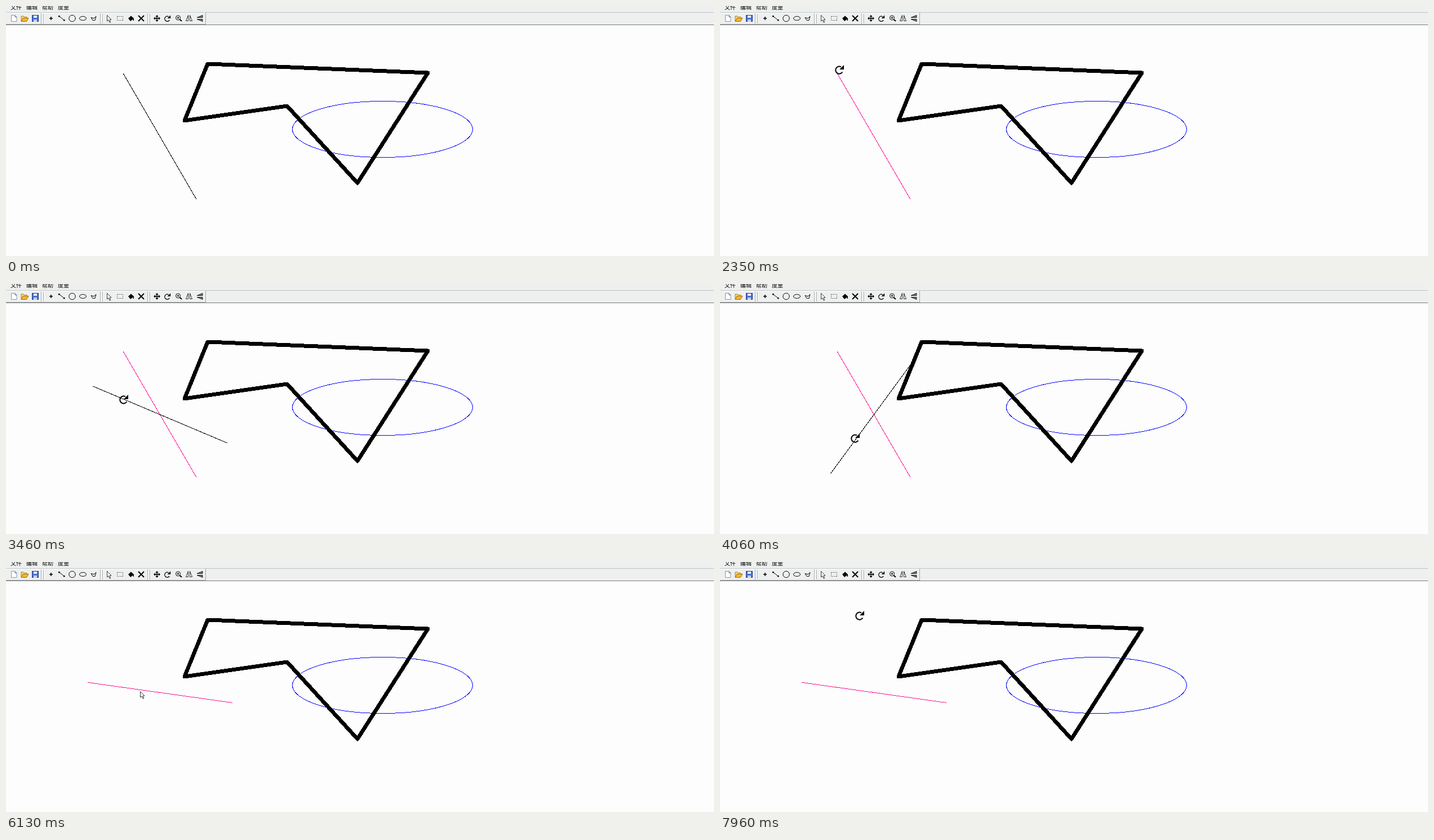
Animation of 1257 by 445 pixels, one loop 7990 ms. Source, as an HTML page:

```html
<!DOCTYPE html>
<html lang="zh">
<head>
<meta charset="utf-8">
<style>
html, body { margin: 0; width: 100%; height: 100%; overflow: hidden; background: #fdfdfd; }
svg { display: block; }
text { font: 10px "Noto Sans CJK SC", "Noto Sans CJK", sans-serif; }
.crisp { shape-rendering: crispEdges; }
.ink { fill: none; stroke: #000; }
</style>
</head>
<body>
<svg width="1257" height="445" viewBox="0 0 1257 445">
  <defs>
    <path id="arrow" d="M.5 .5V11L3 8.7 4.8 13H6.6L5 8.2H8Z" fill="#fff" stroke="#222" stroke-width=".9"/>
    <g id="turn">
      <path class="ink" d="M5.3 4.5A6.5 6.5 0 1 1 3-4.5" stroke-width="2"/>
      <path d="M8-8V0H0Z"/>
    </g>
    <g id="grip" class="crisp" fill="none">
      <path d="M.5 13V32M4.5 14V31" stroke="#a8aaaa"/>
      <path d="M1.5 13V32M5.5 14V31" stroke="#fff"/>
    </g>
    <path id="flip" d="M-1.5-5.5V4.5H-5.5ZM1.5-5.5V4.5H5.5Z" stroke="#111" stroke-width=".9"/>
  </defs>

  <g id="bars">
    <rect width="1257" height="33" fill="#eef0f0"/>
    <g class="crisp">
      <path d="M0 11.5H1257" stroke="#bfc2c2"/>
      <path d="M0 12.5H354" stroke="#fff"/>
      <path d="M0 32.5H354M354.5 12V33" stroke="#a4a6a6"/>
      <path d="M0 33.5H1257" stroke="#777"/>
    </g>
    <text x="8" y="6">文件</text><text x="36" y="6">编辑</text>
    <text x="64" y="6">帮助</text><text x="92" y="6">度量</text>
    <use href="#grip" x="62"/><use href="#grip" x="167"/><use href="#grip" x="251"/>
  </g>
  <rect id="hover" class="crisp" y="13.5" width="17" height="17" fill="#f6f7f7" stroke="#9a9c9c"/>

  <g id="icons">
    <path d="M9.5 16.5H16L19 19.5V27.5H9.5Z" fill="#fff" stroke="#8795a5"/>
    <path d="M16 16.5V19.5H19" fill="none" stroke="#56687c"/>
    <path d="M27 27V18H31L32 19.5H37V22" fill="#f8dc78" stroke="#a77b20"/>
    <path d="M27 27.5L30 21.5H40L36.5 27.5Z" fill="#f3b62f" stroke="#a06d16"/>
    <rect x="46.5" y="16.5" width="11" height="11" fill="#4a6fd0" stroke="#253b88"/>
    <path d="M49 17H55V21H49Z" fill="#e9f0ff"/><path d="M49 24H55V28H49Z" fill="#c4d0ea"/>
    <path class="ink" d="M77 22H83M80 19V25" stroke-width="1.5"/>
    <path class="ink" d="M94 18L103 25"/><path d="M93 17H95.5V19.5H93ZM102 24H104.5V26.5H102Z"/>
    <circle class="ink" cx="117.5" cy="22" r="5.7"/>
    <ellipse class="ink" cx="136.5" cy="22" rx="6" ry="3.5"/>
    <path class="ink" d="M151 20.5L156 22 160 18.5 158 25.5H154Z"/>
    <use href="#arrow" x="179" y="16"/>
    <rect class="ink crisp" x="197.5" y="18.5" width="10" height="7" stroke-dasharray="2 1" style="stroke:#777"/>
    <path d="M217 22L222 17.5 227 22V26H225.5V23.5L221 27Z"/>
    <path class="ink" d="M235 17L245 27M245 17L235 27" stroke-width="2"/>
    <g transform="translate(268 22)">
      <path class="ink" d="M-4 0H4M0-4V4" stroke-width="1.5"/>
      <path d="M-6 0L-3-2.7V2.7ZM6 0L3-2.7V2.7ZM0-6L-2.7-3H2.7ZM0 6L-2.7 3H2.7Z"/>
    </g>
    <use href="#turn" transform="translate(286.5 22) scale(.7)"/>
    <circle class="ink" cx="305.5" cy="21" r="4"/>
    <path class="ink" d="M303.5 21H307.5M305.5 19V23"/>
    <path class="ink" d="M308.5 24L312 27" stroke-width="2"/>
    <use href="#flip" x="325" y="22" fill="#fff"/>
    <use href="#flip" transform="translate(344.5 22) rotate(-90)" fill="#777"/>
  </g>

  <g class="crisp" fill="none">
    <ellipse cx="668.5" cy="219.5" rx="160" ry="50" stroke="#00f"/>
    <path d="M358 103L749 119 624 315 499 178 317 204Z" stroke="#000" stroke-width="7" stroke-linejoin="round"/>
    <path id="line"/>
    <path id="preview" stroke="#000"/>
  </g>
  <use id="pointer" href="#arrow"/>
  <use id="rotor" href="#turn"/>
</svg>
<script>
const LOOP = 7990, PINK = '#ff1493', CX = 273.3, CY = 232.4;
const PICKED = 880, DRAG = 2560, DROPPED = 4900, REPICKED = 6130, CIRCLE = 7540;

// time, x, y
const approach = [
  [340, 1189, 37], [400, 839, 95], [460, 519, 120], [520, 376, 136], [600, 286, 175],
  [860, 242, 180], [1180, 242, 176], [1420, 242, 176], [1600, 231, 95],
  [1900, 285, 20], [2220, 285, 20], [2350, 212, 113], [2480, 196, 127], [2560, 219, 117]
];
const comeback = [
  [5170, 418, 254], [5500, 182, 20], [5680, 182, 20], [5950, 241, 226], [6130, 238, 230],
  [6279, 238, 230], [6280, 256, 196], [6490, 256, 196], [6750, 285, 20],
  [6930, 285, 20], [7240, 386, 260], [7359, 386, 260], [7390, 383, 248]
];
// time, degrees, cursor radius
const spin = [
  [2560, 65, 127], [2800, 80, 122], [3040, 65, 123], [3460, 23, 70], [3820, 9, 68],
  [4200, -90, 44], [4450, -205, 131], [4660, -178, 143], [4900, -172, 148]
];
const circle = [[7540, 8.3, 111], [7730, 106, 84], [7860, 200, 92], [7960, 259.4, 140]];

const el = id => document.getElementById(id);
const show = (id, on) => el(id).setAttribute('visibility', on ? 'visible' : 'hidden');

function at(keys, t) {
  const next = keys.findIndex(k => k[0] > t);
  if (next < 0) return keys[keys.length - 1].slice(1);
  if (next === 0) return keys[0].slice(1);
  const a = keys[next - 1], b = keys[next], f = (t - a[0]) / (b[0] - a[0]);
  return a.slice(1).map((v, i) => v + (b[i + 1] - v) * f);
}

function polar(deg, r) {
  const a = deg * Math.PI / 180;
  return [CX + r * Math.cos(a), CY + r * Math.sin(a)];
}

const segment = deg => `M${polar(deg + 180, 129.5)}L${polar(deg, 129.5)}`;

function cursor(t) {
  if (t < DRAG) return at(approach, t);
  if (t >= CIRCLE) return polar(...at(circle, t));
  if (t >= DROPPED) return at(comeback, t);
  // the line trails the cursor a little late in the drag
  const lead = 5 * Math.min(1, Math.max(0, (t - 3460) / 1200));
  const [deg, r] = at(spin, t);
  return polar(deg + 180 + lead, r);
}

function draw(now) {
  const t = now % LOOP;
  const [x, y] = cursor(t).map(Math.round);
  const inBar = y < 33;
  const turning = !inBar && (t > 2000 && t < 5600 || t > 6800);
  const black = t < PICKED || t >= DROPPED && t < REPICKED;

  el('line').setAttribute('d', segment(t < DROPPED ? 59.9 : 8));
  el('line').setAttribute('stroke', black ? '#000' : PINK);
  el('preview').setAttribute('d', segment(at(spin, t)[0]));
  show('preview', t >= DRAG && t < DROPPED);

  show('pointer', t >= 100 && !turning);
  show('rotor', turning);
  for (const id of ['pointer', 'rotor']) el(id).setAttribute('transform', `translate(${x} ${y})`);

  show('hover', inBar);
  el('hover').setAttribute('x', x < 230 ? 173.5 : 278.5);
}

function tick() {
  draw(performance.now());
  requestAnimationFrame(tick);
}
tick();
</script>
</body>
</html>
```
